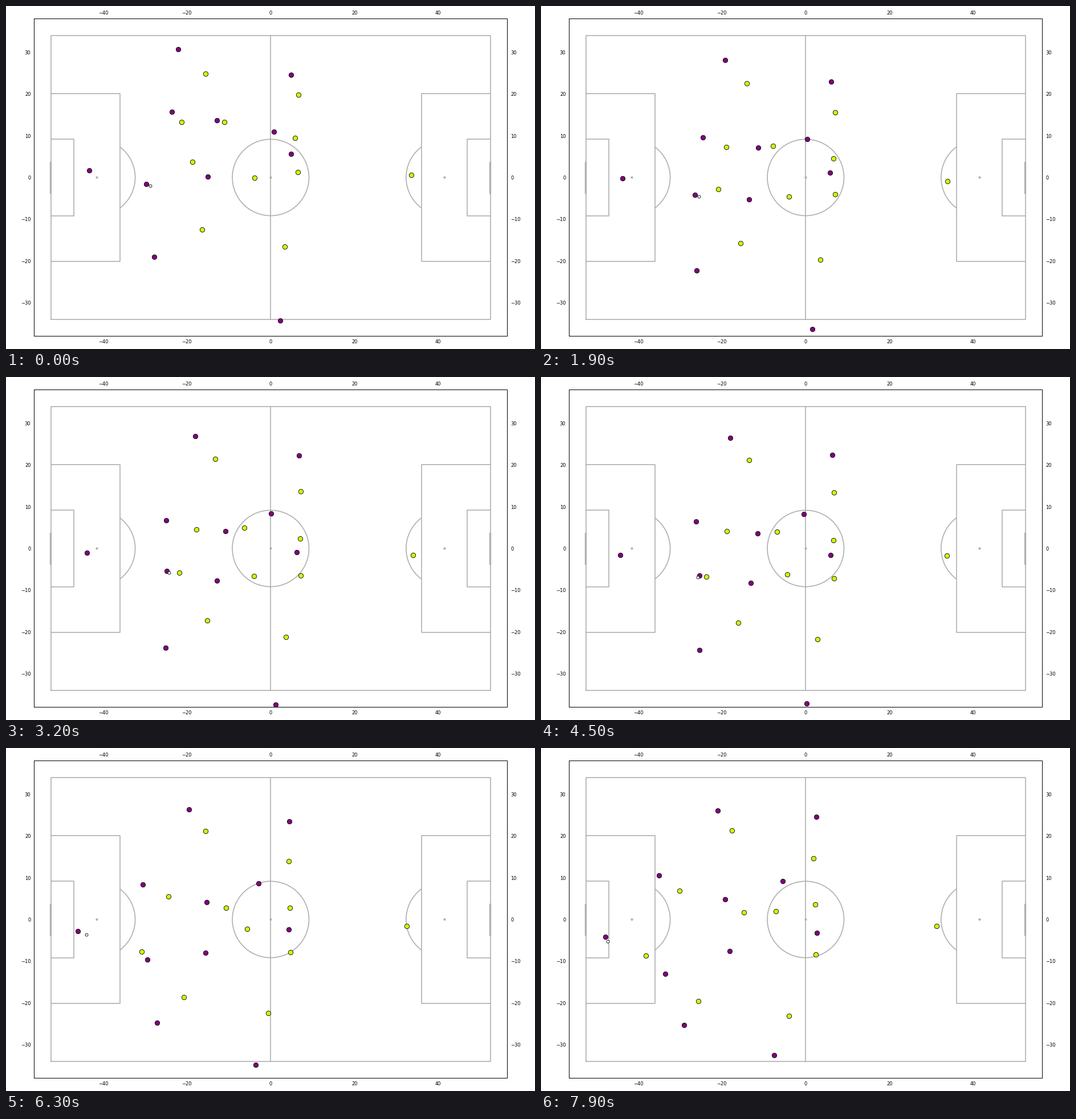
Animation of 928 by 603 pixels, one loop 8000 ms. Source, as a matplotlib script:

```python
import numpy as np
import matplotlib.pyplot as plt
from matplotlib.animation import FuncAnimation
from matplotlib.patches import Arc

W, H, DPI = 928, 603, 60
FRAMES, STEP = 80, 100
HALF_X, HALF_Y = 56.5, 38
LEFT, TOP, AX_W, AX_H = 49.25, 22.45, 830, 558
GREY, HOME, AWAY = "#b0b0b0", "#800080", "#ccff00"

plt.rcParams["font.family"] = "DejaVu Sans"
plt.rcParams["font.size"] = 10
plt.rcParams["axes.linewidth"] = 1.2

fig = plt.figure(figsize=(W / DPI, H / DPI), dpi=DPI, facecolor="white")
ax = fig.add_axes([LEFT / W, 1 - (TOP + AX_H) / H, AX_W / W, AX_H / H])
ax.set_xlim(-HALF_X, HALF_X)
ax.set_ylim(-HALF_Y, HALF_Y)
ax.set_xticks(range(-40, 41, 20))
ax.set_yticks(range(-30, 31, 10))
ax.tick_params(top=False, bottom=False, left=False, right=False,
               labeltop=True, labelright=True)


# ---- pitch ----
def line(xs, ys, lw=2):
    ax.plot(xs, ys, color=GREY, lw=lw, zorder=1)


def arc(x, r, a0=0, a1=360):
    ax.add_patch(Arc((x, 0), 2 * r, 2 * r, theta1=a0, theta2=a1,
                     color=GREY, lw=2, zorder=1))


def spot(x):
    ax.plot([x], [0], "o", color=GREY, ms=4, zorder=1)


line([-52.5, 52.5, 52.5, -52.5, -52.5], [-34, -34, 34, 34, -34])
line([0, 0], [-34, 34])
arc(0, 9.15)
spot(0)
bend = np.degrees(np.arccos(5.5 / 9.15))
for side, mid in ((-1, 0), (1, 180)):
    for depth, half in ((16.5, 20.15), (5.5, 9.16)):
        inner = side * (52.5 - depth)
        line([side * 52.5, inner, inner, side * 52.5], [-half, -half, half, half])
    line([side * 52.5 - 0.1] * 2, [-3.66, 3.66], lw=4)
    arc(side * 41.5, 9.15, mid - bend, mid + bend)
    spot(side * 41.5)


# ---- motion ----
TURN, KICK, CATCH, END = 3.9, 4.5, 6.45, 7.9


def ease(t, start, turn, end):
    """Slow down towards the turn, then pick up speed towards the end."""
    start, turn, end = map(np.array, (start, turn, end))
    if t < TURN:
        return start + (turn - start) * (1 - (1 - t / TURN) ** 1.5)
    return turn + (end - turn) * ((t - TURN) / (END - TURN)) ** 1.2


def to_pitch(points):
    """Stage pixels to metres, measured from the middle pixel."""
    x, y = np.asarray(points).T
    return (x - W / 2 - 0.5) * 2 * HALF_X / AX_W, (H / 2 + 0.5 - y) * 2 * HALF_Y / AX_H


# Each player: start, turning point, end.
carrier = (246, 313.5), (285, 344), (218, 397.5)
keeper = (146, 290), (142, 311), (113, 332.5)

home = [
    carrier, keeper,
    ((302, 77), (335, 107), (310, 110.5)),
    ((500, 122), (515, 139.5), (483, 121.5)),
    ((291.5, 187), (280, 258), (207, 225)),
    ((370, 202), (387, 277), (323, 267)),
    ((470.5, 222), (465, 242), (424, 235)),
    ((500, 261), (511, 312), (484, 326)),
    ((354, 300.5), (372, 363.5), (331, 358)),
    ((260, 441.5), (281.5, 479.5), (251, 487.5)),
    ((481.5, 553.5), (473, 578), (409.5, 540.5)),
]
away = [
    ((350, 120), (368.5, 146.5), (335.5, 146)),
    ((513.5, 157), (518, 205), (478.5, 194.5)),
    ((308, 205), (336, 274), (243, 251.5)),
    ((383, 205), (421, 271), (356.5, 290)),
    ((507, 233), (517, 288.5), (481.5, 275.5)),
    ((327, 274.5), (302, 350), (184, 366)),
    ((512, 293), (518, 354), (482.5, 363.5)),
    ((436, 302.5), (435, 354), (412.5, 288)),
    ((344, 393.5), (354, 431), (276.5, 445.5)),
    ((489, 423.5), (491, 460), (435, 471.5)),
    ((711, 298), (714.5, 314.5), (694, 313.5)),
]


def dribble(t):
    return ease(t, *carrier) + (7 - 10 * (t / KICK) ** 4, 3)


def ball(t):
    """Dribble, pass back to the keeper, then stay at his feet."""
    if t < KICK:
        return dribble(t)
    fly = min((t - KICK) / (CATCH - KICK), 1)
    feet = ease(t, *keeper) + (4, 8 * (t - KICK) / (END - KICK))
    return dribble(KICK) * (1 - fly) + feet * fly


# ---- drawing ----
def dots(color, size, z):
    return ax.plot([], [], "o", mfc=color, mec="black", mew=1, ms=size, zorder=z)[0]


home_dots, away_dots, ball_dot = dots(HOME, 10, 2.1), dots(AWAY, 10, 2.2), dots("white", 6, 2.3)


def draw(n):
    t = n * STEP / 1000
    home_dots.set_data(*to_pitch([ease(t, *p) for p in home]))
    away_dots.set_data(*to_pitch([ease(t, *p) for p in away]))
    ball_dot.set_data(*to_pitch([ball(t)]))
    return home_dots, away_dots, ball_dot


anim = FuncAnimation(fig, draw, frames=FRAMES, interval=STEP, repeat=True,
                     repeat_delay=0, blit=False)
plt.show()
```
